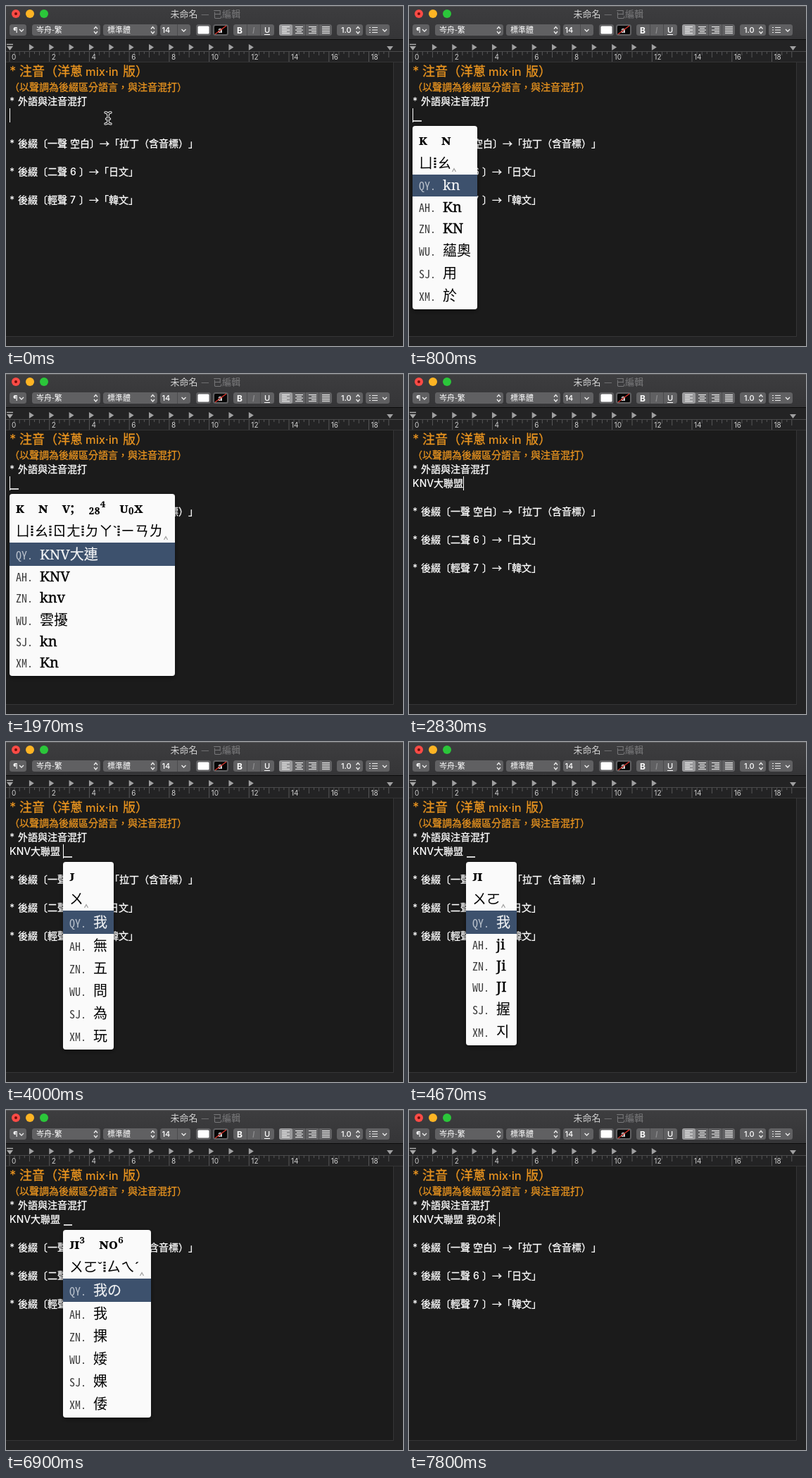
An HTML page for the animation above (8000 ms loop, 564 by 482 pixels).

```html
<!DOCTYPE html>
<html lang="zh-Hant">
<head>
<meta charset="utf-8">
<title>Zhuyin typing</title>
<style>
html, body { margin: 0; width: 100%; height: 100%; overflow: hidden; background: #1b1b1b; }
svg { display: block; text-spacing-trim: space-all; }
text { font-family: 'Noto Sans CJK TC', 'Noto Sans CJK', sans-serif; white-space: pre; }
.latin { font-family: Inter, 'Noto Sans CJK TC', sans-serif; }
.doc { fill: #fff; font-size: 14px; font-weight: 500; stroke: #fff; stroke-width: .3px; }
.doc.latin { stroke-width: 0; }
.doc.head { fill: #e8931f; stroke: #e8931f; }
.tool { fill: #fff; font-size: 11px; font-weight: 500; }
.ruler { fill: #d0d0d0; font-size: 10px; }
.keys { font: 700 20px 'Noto Serif', 'Noto Sans CJK TC', serif; }
.zhuyin { font-size: 20px; }
.tone { font: 700 17px 'Noto Serif', serif; text-anchor: middle; }
.label { font: 16px 'Noto Sans Mono CJK TC', 'Noto Sans Mono', monospace; fill: #3c3c3c; }
.cand { font: 20px 'Noto Serif', 'Noto Sans CJK TC', sans-serif; }
.cand.roman { stroke: #000; stroke-width: .4px; }
.picked .label { fill: #b9c1cc; }
.picked .cand { fill: #f1f3f5; stroke: #f1f3f5; stroke-width: .2px; }
</style>
</head>
<body>
<svg width="564" height="482" viewBox="0 0 564 482">
  <defs>
    <linearGradient id="bar" x2="0" y2="1">
      <stop stop-color="#3d3d3f"/><stop offset="1" stop-color="#353537"/>
    </linearGradient>
    <filter id="shadow" x="-20%" y="-20%" width="140%" height="140%">
      <feDropShadow dx="0" dy="2" stdDeviation="3" flood-color="#000" flood-opacity=".5"/>
    </filter>
  </defs>
  <rect width="564" height="482" fill="#232324"/>
  <rect y="80" width="550" height="388" fill="#1b1b1b"/>
  <path d="M550.5 80V468.5H0" fill="none" stroke="#363637"/>
  <rect width="564" height="48" fill="url(#bar)"/>
  <path d="M0 .5H564" stroke="#58585a"/>
  <path d="M0 47.5H564" stroke="#0c0c0c"/>
  <path d="M0 79.5H564" stroke="#343435"/>
  <g id="chrome"></g>
  <g id="ruler"></g>
  <g id="page"></g>
  <path id="caret" stroke="#fff" d="M.5 145V165"/>
  <path id="preedit" stroke="#fff" stroke-width="1.6" d="M1 163H13"/>
  <g id="panel"></g>
  <g id="pointer" fill="none" stroke-linecap="round">
    <path id="beam" stroke="#f4f4f4" stroke-width="3.4" d="M141 151Q145 151 145 155Q145 151 149 151M145 154V163M141 167Q145 167 145 163Q145 167 149 167M142.5 160H147.5"/>
    <path stroke="#111" stroke-width="1.3" d="M141 151Q145 151 145 155Q145 151 149 151M145 154V163M141 167Q145 167 145 163Q145 167 149 167M142.5 160H147.5"/>
  </g>
</svg>
<script>
const $ = id => document.getElementById(id);
const text = (x, y, s, cls, extra = '') => `<text class="${cls}" x="${x}" y="${y}" ${extra}>${s}</text>`;
const box = (x, y, w, h, fill, r = 0) => `<rect x="${x}" y="${y}" width="${w}" height="${h}" rx="${r}" fill="${fill}"/>`;
const line = (d, color = '#fff', w = 1) => `<path d="${d}" fill="none" stroke="${color}" stroke-width="${w}"/>`;
const shape = (d, color) => `<path d="${d}" fill="${color}"/>`;

function drawChrome() {
  const button = (a, b) => box(a, 26, b - a, 16, '#606062', 3.5);
  const down = x => line(`M${x - 3} 33l3 3l3-3`, '#eee', 1.3);
  const upDown = x => line(`M${x - 2.5} 32.5l2.5-3l2.5 3M${x - 2.5} 36l2.5 3l2.5-3`, '#eee', 1.3);
  let s = '';
  ['#fc4b46', '#fdb424', '#2bc63a'].forEach((c, i) => s += `<circle cx="${14 + 20 * i}" cy="11" r="6" fill="${c}"/>`);
  s += '<circle cx="14" cy="11" r="2" fill="#750d0a"/>';
  s += text(233.5, 16, '未命名', 'tool', 'style="font-size:13px;fill:#d2d2d2"');
  s += text(277, 16, '—', 'tool', 'style="font-size:13px;fill:#7b7b7d"');
  s += text(294, 16, '已編輯', 'tool', 'style="font-size:13px;fill:#7b7b7d"');
  [[5, 29], [37, 134], [138, 215], [219, 262], [270, 291], [294, 316], [323, 381], [388, 463], [470, 507], [511, 545]]
    .forEach(([a, b]) => s += button(a, b));
  s += text(10, 38, '¶', 'tool latin') + down(22);
  s += text(43, 38, '岑舟-繁', 'tool') + upDown(127.5);
  s += text(144, 38, '標準體', 'tool') + upDown(208.5);
  s += text(221.5, 38, '14', 'tool latin') + line('M243.5 26V42', '#4a4a4c') + down(252.5);
  s += box(272.5, 28.5, 16, 11, '#fff', 1.5);
  s += box(296, 28, 18, 12, '#070707', 1.5) + text(301, 38, 'a', 'tool latin', 'style="font-weight:700"') + line('M297 40L313 28', '#e2382f', 1.2);
  s += text(328, 38.5, 'B', 'tool latin', 'style="font-size:12px;font-weight:700"');
  s += text(350, 38.5, 'I', 'tool latin', 'style="font-size:12px;font-style:italic;fill:#8c8c8e"');
  s += text(367, 37.5, 'U', 'tool latin') + line('M367 40.5H375');
  s += line('M342.5 26V42M361.5 26V42', '#4a4a4c');
  s += box(388, 26, 19, 16, '#99999b', 3);
  for (let k = 0; k < 4; k++) {
    const x = 392 + 19 * k;
    for (let j = 0; j < 5; j++) {
      const w = k == 3 || j % 2 == 0 ? 11 : 7;
      s += line(`M${x + [0, 2, 4, 0][k] * (w < 11)} ${29.5 + 2.3 * j}h${w}`, '#f2f2f2');
    }
  }
  s += line('M425.5 26V42M444.5 26V42', '#4a4a4c');
  s += text(476, 38, '1.0', 'tool latin') + upDown(500);
  for (let j = 0; j < 3; j++) s += line(`M516 ${30.5 + 3.5 * j}h2m2 0h8`, '#eee', 1.2);
  s += down(538);
  $('chrome').innerHTML = s;
}

function drawRuler() {
  const unit = 28.36;
  let s = line('M0 64.5H564', '#4a4a4b');
  for (let i = 0; i <= 76; i++) {
    const h = i % 8 == 0 ? 14 : i % 4 == 0 ? 8 : i % 2 == 0 ? 5 : 3;
    s += line(`M${(5 + unit * i / 4).toFixed(1)} 65v${h}`, '#656566', .8);
  }
  for (let n = 0; n < 20; n += 2) s += text(8 + unit * n, 76, n, 'ruler latin');
  for (let k = 1; k <= 12; k++) s += shape(`M${4.5 + unit * k} 54v9l7-4.5z`, '#a0a0a1');
  s += line('M1 54.5H10', '#a8a8a8', 1.5) + shape('M1 57h9l-4.5 6z', '#a8a8a8') + shape('M541 57h9l-4.5 6z', '#a0a0a1');
  $('ruler').innerHTML = s;
}

function drawPage() {
  const doc = (x, y, s) => text(x, y, s, 'doc');
  const latin = (x, y, s) => text(x, y, s, 'doc latin');
  const title = (x, s, cls, size) => text(x, 99, s, 'doc head ' + cls, `style="font-size:${size}px"`);
  let s = title(5, '*', 'latin', 18) + title(19, '注音（洋蔥', '', 18) + title(113, 'mix·in', 'latin', 16.5) + title(166, '版）', '', 18);
  s += text(5, 120, '（以聲調為後綴區分語言，與注音混打）', 'doc head');
  [140, 200, 240, 280].forEach(y => s += latin(5, y, '*'));
  s += doc(17, 140, '外語與注音混打');
  s += doc(17, 200, '後綴〔一聲') + doc(91, 200, '空白〕→「拉丁（含音標）」');
  s += doc(17, 240, '後綴〔二聲') + latin(91, 240, '6') + doc(104, 240, '〕→「日文」');
  s += doc(17, 280, '後綴〔輕聲') + latin(91, 280, '7') + doc(104, 280, '〕→「韓文」');
  s += `<g id="first">${latin(5, 160, 'KNV')}${doc(35, 160, '大聯盟')}</g>`;
  s += `<g id="second">${doc(82, 160, '我の茶')}</g>`;
  $('page').innerHTML = s;
}

// Each step: time, keys pressed, phonetic row, candidates. Empty keys close the panel.
const tail = ' KNV knv 雲擾 kn Kn';
const low = ' 捰 婑 婐 倭 踒';
const steps = [
  [0, '', '', ''],
  [330, 'ᴋ', 'ㄩ', '於 用 雲 魚 與 遇'],
  [530, 'ᴋ ɴ', 'ㄩ|ㄠ', 'kn Kn KN 蘊奧 用 於'],
  [900, 'ᴋ ɴ ᴠ', 'ㄩ|ㄠ|ㄖ', 'KNV knv 雲擾 kn Kn KN'],
  [1070, 'ᴋ ɴ ᴠ;', 'ㄩ|ㄠ|ㄖㄤ', 'KNV knv 雲擾 kn Kn KN'],
  [1370, 'ᴋ ɴ ᴠ; ₂', 'ㄩ|ㄠ|ㄖㄤ|ㄉ', 'KNV的' + tail],
  [1500, 'ᴋ ɴ ᴠ; ₂₈', 'ㄩ|ㄠ|ㄖㄤ|ㄉㄚ', 'KNV大' + tail],
  [1630, 'ᴋ ɴ ᴠ; ₂₈⁴', 'ㄩ|ㄠ|ㄖㄤ|ㄉㄚˋ', 'KNV大' + tail],
  [1770, 'ᴋ ɴ ᴠ; ₂₈⁴ ᴜ', 'ㄩ|ㄠ|ㄖㄤ|ㄉㄚˋ|ㄧ', 'KNV大一' + tail],
  [1870, 'ᴋ ɴ ᴠ; ₂₈⁴ ᴜ₀', 'ㄩ|ㄠ|ㄖㄤ|ㄉㄚˋ|ㄧㄢ', 'KNV大眼' + tail],
  [1940, 'ᴋ ɴ ᴠ; ₂₈⁴ ᴜ₀x', 'ㄩ|ㄠ|ㄖㄤ|ㄉㄚˋ|ㄧㄢㄌ', 'KNV大連' + tail],
  [2270, 'ᴋ ɴ ᴠ; ₂₈⁴ ᴜ₀x ᴀ', 'ㄩ|ㄠ|ㄖㄤ|ㄉㄚˋ|ㄧㄢㄌ|ㄇ', 'KNV大聯盟' + tail],
  [2370, 'ᴋ ɴ ᴠ; ₂₈⁴ ᴜ₀x ᴀ/', 'ㄩ|ㄠ|ㄖㄤ|ㄉㄚˋ|ㄧㄢㄌ|ㄇㄥ', 'KNV大聯盟' + tail],
  [2830, '', '', ''],
  [4000, 'ᴊ', 'ㄨ', '我 無 五 問 為 玩'],
  [4130, 'ᴊɪ', 'ㄨㄛ', '我 ji Ji JI 握 지'],
  [4970, 'ᴊɪ³', 'ㄨㄛˇ', '我' + low],
  [5930, 'ᴊɪ³ ɴ', 'ㄨㄛˇ|ㄙ', '我' + low],
  [6330, 'ᴊɪ³ ɴᴏ', 'ㄨㄛˇ|ㄙㄟ', '我' + low],
  [6900, 'ᴊɪ³ ɴᴏ⁶', 'ㄨㄛˇ|ㄙㄟˊ', '我の 我 捰 婑 婐 倭'],
  [7030, 'ᴊɪ³ ɴᴏ⁶ ᴛ', 'ㄨㄛˇ|ㄙㄟˊ|ㄔ', '我の 我 捰 婑 婐 倭'],
  [7170, 'ᴊɪ³ ɴᴏ⁶ ᴛ₈', 'ㄨㄛˇ|ㄙㄟˊ|ㄔㄚ', '我の茶 我の 我 捰 婑 婐'],
  [7470, '', '', '']
];
// Caret: time, x, shown.
const carets = [[0, 5, 1], [2600, 5, 0], [2830, 77, 1], [3030, 81, 1], [3670, 81, 0], [4000, 81, 1],
  [4670, 81, 0], [4970, 81, 1], [5770, 81, 0], [7470, 124, 1], [7800, 128, 1]];
const labels = ['QY.', 'AH.', 'ZN.', 'WU.', 'SJ.', 'XM.'];
const toneWidth = { 'ˋ': 5, 'ˇ': 7, 'ˊ': 6 };

function drawPanel([time, keys, row, list]) {
  const panel = $('panel');
  if (!keys) { panel.innerHTML = ''; return; }
  const left = time < 4000 ? 5 : 81;
  let s = text(left + 9, 197, keys.replaceAll(' ', '\u3000'), 'keys');
  let x = left + 9;
  for (const c of row) {
    if (c == '|') {
      s += line(`M${x + 3} 215v15`, '#000', 3).replace('/>', ' stroke-dasharray="2.6 1.4"/>');
      x += 6;
    } else if (toneWidth[c]) {
      s += text(x + toneWidth[c] / 2, 228, c, 'tone');
      x += toneWidth[c];
    } else {
      s += text(x, 230, c, 'zhuyin');
      x += 20;
    }
  }
  s += line(`M${x + 1.5} 235l2.5-4.5l2.5 4.5`, '#a2a2a2', 1.3);
  let top = 239, picked = 0;
  list.split(' ').forEach((word, i) => {
    const wide = /[^\x00-\x7f]/.test(word);
    const h = (wide ? 32 : 30) + (i ? 0 : 1);
    const base = top + (wide ? 24 : 22);
    s += `<g class="${i ? '' : 'picked'}">` + text(left + 9, base, labels[i], 'label')
      + text(left + 43, base, word, wide ? 'cand' : 'cand roman') + '</g>';
    if (!i) picked = h;
    top += h;
  });
  panel.innerHTML = s;
  const ends = [...panel.querySelectorAll('.cand, .keys')].map(t => +t.getAttribute('x') + t.getComputedTextLength());
  const width = Math.round(Math.max(x + 8, ...ends) + 9 - left);
  const back = `<g filter="url(#shadow)">${box(left, 170, width, top + 4 - 170, '#fafafa', 4)}</g>` + box(left, 239, width, picked, '#3d516d');
  panel.insertAdjacentHTML('afterbegin', back);
}

const at = (list, t) => list.findLast(e => e[0] <= t);
const show = (id, on) => $(id).style.visibility = on ? 'visible' : 'hidden';
const start = performance.now();
let shown;

function frame() {
  const t = (performance.now() - start) % 8000;
  const step = at(steps, t), [, x, lit] = at(carets, t);
  if (step !== shown) drawPanel(shown = step);
  show('pointer', t < 30);
  show('caret', lit);
  show('preedit', step[1]);
  show('first', t >= 2830);
  show('second', t >= 7470);
  for (const id of ['caret', 'preedit']) $(id).setAttribute('transform', `translate(${x})`);
  requestAnimationFrame(frame);
}

drawChrome();
drawRuler();
drawPage();
frame();
</script>
</body>
</html>
```
